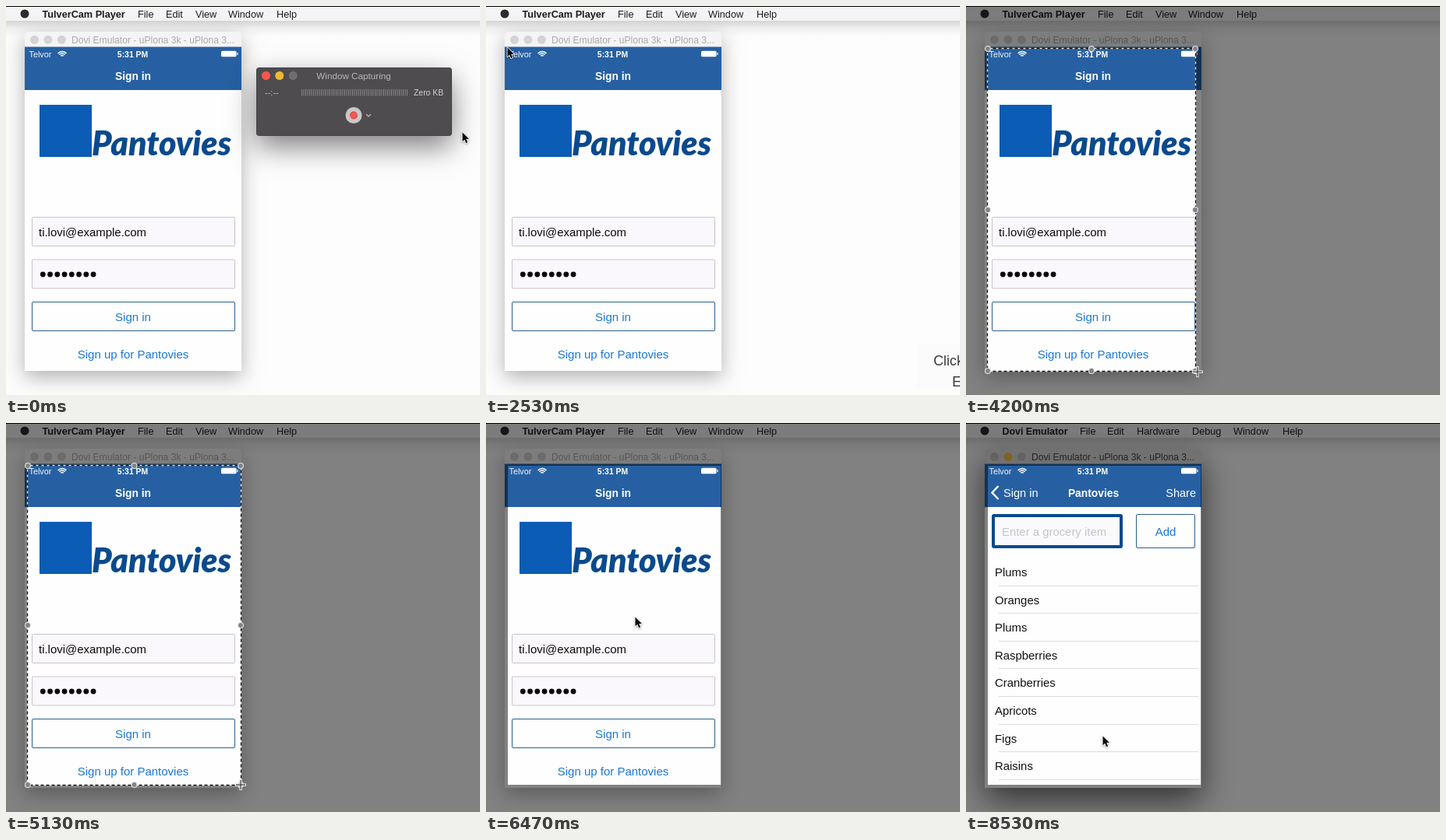
Animation of 608x500 px, one loop 8790 ms. Source, as an HTML page with a canvas:

```html
<!DOCTYPE html>
<html lang="en">
<head>
<meta charset="utf-8">
<title>Sign in demo</title>
<style>
  html, body { margin: 0; width: 100%; height: 100%; overflow: hidden; background: #fefdfe; }
  canvas { display: block; }
</style>
</head>
<body>
<canvas id="stage" width="608" height="500"></canvas>
<script>
const ctx = document.getElementById('stage').getContext('2d');
const W = 608, H = 500, LOOP = 8790, STEP = 200 / 3;
const SANS = '"Liberation Sans", Arial, sans-serif';
const BLUE = '#2660a2', NAVY = '#0a4a8d', LINK = '#1878d8', EDGE = '#2c5f8d';
const APP = 'Pantovies', DEVICE = 'Dovi Emulator';
const ITEMS = ['Plums', 'Oranges', 'Plums', 'Raspberries', 'Cranberries', 'Apricots', 'Figs', 'Raisins'];

// Moments of the story, in ms
const T = { panelOff: 900, hintOn: 990, drag: 2860, release: 5250, record: 6250,
            activate: 7520, push: 7790, pushEnd: 8270, listOn: 8320, listEnd: 8520 };

// Pointer path: time, x, y
const PATH = [
  [0, 585, 161], [140, 570, 158], [400, 480, 146], [600, 449, 139], [930, 445, 138],
  [1030, 420, 138], [1267, 259, 138], [1500, 150, 112], [1870, 60, 72], [2200, 33, 56],
  [2533, 27, 52], [2800, 28, 55], [2867, 28, 56], [3070, 52, 96], [3267, 125, 238],
  [3400, 185, 336], [3467, 195, 362], [3730, 250, 432], [4000, 288, 468], [4270, 300, 471],
  [4600, 301, 465], [5250, 301, 465], [5400, 282, 430], [5670, 215, 305], [5930, 172, 258],
  [6270, 172, 256], [6467, 191, 248], [6600, 192, 262], [6870, 184, 350], [7070, 177, 394],
  [7200, 175, 401], [8790, 175, 401]
];

const clamp = v => Math.max(0, Math.min(1, v));
const span = (t, a, b) => clamp((t - a) / (b - a));
const easeOut = p => 1 - (1 - p) ** 3;

function pointer(t) {
  const i = Math.max(1, PATH.findIndex(k => k[0] > t));
  const [t0, x0, y0] = PATH[i - 1], [t1, x1, y1] = PATH[i];
  const p = span(t, t0, t1);
  return { x: x0 + (x1 - x0) * p, y: y0 + (y1 - y0) * p };
}

function text(str, x, y, size, color, { align = 'left', weight = 'normal', family = SANS } = {}) {
  ctx.font = `${weight} ${size}px ${family}`;
  ctx.textAlign = align;
  ctx.fillStyle = color;
  ctx.fillText(str, x, y);
}

function rect(x, y, w, h, color) {
  ctx.fillStyle = color;
  ctx.fillRect(x, y, w, h);
}

function dot(x, y, r, color) {
  ctx.beginPath();
  ctx.arc(x, y, r, 0, 7);
  ctx.fillStyle = color;
  ctx.fill();
}

function box(x, y, w, h, r, fill, stroke, line = 1) {
  ctx.beginPath();
  ctx.roundRect(x, y, w, h, r);
  if (fill) { ctx.fillStyle = fill; ctx.fill(); }
  if (stroke) { ctx.strokeStyle = stroke; ctx.lineWidth = line; ctx.stroke(); }
}

function poly(points, color, line) {
  ctx.beginPath();
  points.forEach(([x, y]) => ctx.lineTo(x, y));
  ctx.strokeStyle = color;
  ctx.lineWidth = line;
  ctx.stroke();
}

function shadowed(blur, dy, alpha, draw) {
  ctx.save();
  ctx.shadowColor = `rgba(0,0,0,${alpha})`;
  ctx.shadowBlur = blur;
  ctx.shadowOffsetY = dy;
  draw();
  ctx.restore();
}

function faded(alpha, draw) {
  if (alpha <= 0) return;
  ctx.save();
  ctx.globalAlpha *= alpha;
  draw();
  ctx.restore();
}

function shifted(dx, draw) {
  ctx.save();
  ctx.translate(dx, 0);
  draw();
  ctx.restore();
}

function menuBar(active) {
  const shade = ctx.createLinearGradient(0, 19, 0, 40);
  shade.addColorStop(0, 'rgba(0,0,0,.16)');
  shade.addColorStop(.45, 'rgba(0,0,0,.05)');
  shade.addColorStop(1, 'rgba(0,0,0,0)');
  rect(0, 19, W, 21, shade);
  rect(0, 0, W, 19, '#f4f3f5');
  rect(0, 0, W, 1, '#000');
  dot(24, 10, 5.5, '#2b2b2b');
  const menus = active
    ? [['File', 146], ['Edit', 181], ['Hardware', 219], ['Debug', 290], ['Window', 343], ['Help', 406]]
    : [['File', 169], ['Edit', 205], ['View', 243], ['Window', 285], ['Help', 347]];
  text(active ? DEVICE : 'TulverCam Player', 46.5, 14.5, active ? 12.4 : 12.7, '#1c1c1c', { weight: 'bold' });
  menus.forEach(([name, x]) => text(name, x, 14.5, 12.7, '#1c1c1c'));
}

function panel() {
  shadowed(36, 14, .5, () => box(321, 79, 251, 88, 4, '#4e4c4e'));
  box(321.5, 79.5, 250, 87, 4, null, '#454345');
  dot(333.5, 89.5, 5.5, '#f9584f');
  dot(350.8, 89.5, 5.5, '#efb92f');
  dot(368.2, 89.5, 5.5, '#706e70');
  text('Window Capturing', 446, 93.5, 11.7, '#b9b8b9', { align: 'center' });
  text('--:--', 332, 115, 11, '#c4c3c4');
  for (let x = 379; x < 515; x += 2.5) rect(x, 107, 1, 8.5, '#858385');
  text('Zero KB', 523, 115, 10.4, '#d4d3d4');
  dot(446, 140.5, 10.5, '#c9c7c8');
  dot(446, 140.5, 5, '#e5443f');
  for (let i = -3; i <= 3; i += 2) poly([[444 + i, 144], [448 + i, 137]], 'rgba(255,190,185,.6)', .7);
  poly([[462, 139], [465, 142], [468, 139]], '#b5b3b5', 1.3);
}

function hint() {
  rect(553, 435, 55, 56, '#fcfbfc');
  text('Click', 574, 462, 17.8, '#3a3a3a');
  text('End', 598, 489, 17.8, '#3a3a3a');
}

function signInPage() {
  rect(24, 108, 278, 361, '#fefefe');
  rect(43, 127, 67, 67, '#0a5cb4');
  text(APP, 110, 192, 42.8, NAVY, { weight: 'italic 900', family: 'Lato, sans-serif' });
  box(33.5, 271.5, 260, 37, 1, '#faf8fc', '#c6c5ca');
  text('ti.lovi@example.com', 42, 295.5, 14.95, '#0a0a0a');
  box(33.5, 326, 260, 37, 1, '#faf8fc', '#c6c5ca');
  for (let i = 0; i < 8; i++) dot(47.3 + i * 9.25, 345, 3.4, '#0a0a0a');
  box(33.5, 380.5, 260, 37, 1.5, '#fefefe', EDGE);
  text('Sign in', 163, 405, 15, LINK, { align: 'center' });
  text('Sign up for ' + APP, 163, 453, 15, LINK, { align: 'center' });
}

function listPage(rows) {
  rect(24, 108, 278, 361, '#fefefe');
  box(35, 119, 164, 40, 1, '#faf9fc', NAVY, 4);
  text('Enter a grocery item', 46, 144.5, 14.9, '#c5c4ca');
  box(218.5, 117.5, 75, 43, 1.5, '#fefefe', EDGE);
  text('Add', 256, 144.5, 15, LINK, { align: 'center' });
  faded(rows, () => ITEMS.forEach((name, i) => {
    const y = 197 + i * 35.6;
    text(name, 37, y, 14.9, '#111');
    rect(42, Math.round(y + 11.5), 256, 1, '#dddce1');
  }));
}

function navBar(p) {
  rect(24, 52.5, 278, 55.5, BLUE);
  const bold = { align: 'center', weight: 'bold' };
  faded(1 - p * 2, () => text('Sign in', 163 - 90 * p, 95, 13.8, '#fff', bold));
  faded(p, () => {
    poly([[41.5, 81], [33.5, 89.5], [41.5, 98]], '#fff', 2.4);
    text('Sign in', 48 + 90 * (1 - p), 95, 14.6, '#fff');
    text(APP, 163.5 + 110 * (1 - p), 95, 13.8, '#fff', bold);
    text('Share', 295, 95, 14.5, '#fff', { align: 'right' });
  });
}

function statusBar() {
  text('Telvor', 29.5, 65.5, 10.8, '#f4f7fb');
  [2.5, 5, 7.4].forEach(r => {
    ctx.beginPath();
    ctx.arc(72, 66, r, -Math.PI * .76, -Math.PI * .24);
    ctx.strokeStyle = '#fff';
    ctx.lineWidth = 1.5;
    ctx.stroke();
  });
  text('5:31 PM', 162.5, 65.5, 10.4, '#fff', { align: 'center', weight: 'bold' });
  box(276, 57.7, 19.5, 7.6, 1.5, '#fff');
  rect(296.3, 60, 1.2, 3, '#fff');
}

function phone(t) {
  const active = t >= T.activate;
  const frame = () => box(24, 33, 278, 436, [5, 5, 0, 0], '#f6f5f6');
  shadowed(active ? 40 : 26, active ? 16 : 8, active ? .6 : .3, frame);
  box(24, 33, 278, 19.5, [5, 5, 0, 0], active ? '#dedddf' : '#f5f4f5');
  const gray = active ? '#c3c2c4' : '#d3d2d4';
  [gray, active ? '#f3bf45' : gray, gray].forEach((c, i) => dot(36.5 + i * 17.4, 43.3, 5.5, c));
  text(DEVICE + ' - uPlona 3k - uPlona 3...', 84, 47.5, 12.1, active ? '#454446' : '#aaa9ab');

  const p = easeOut(span(t, T.push, T.pushEnd));
  ctx.save();
  ctx.beginPath();
  ctx.rect(24, 52, 278, 417);
  ctx.clip();
  if (p < 1) shifted(-84 * p, signInPage);
  if (p > 0) shifted(278 * (1 - p), () => listPage(span(t, T.listOn, T.listEnd)));
  navBar(p);
  statusBar();
  ctx.restore();
}

function selection(t) {
  const end = t < T.release ? pointer(Math.max(T.drag + 7, t - STEP)) : { x: 301, y: 465 };
  const x = 28, y = t < 4000 ? 56 : 55;
  const w = Math.max(1, Math.round(end.x) - x), h = Math.max(1, Math.round(end.y) - y);
  ctx.beginPath();
  ctx.rect(0, 0, W, H);
  ctx.rect(x, y, w, h);
  ctx.fillStyle = 'rgba(0,0,0,.49)';
  ctx.fill('evenodd');
  if (t >= T.record) return;

  ctx.strokeStyle = '#f2f2f2';
  ctx.lineWidth = 1.3;
  ctx.strokeRect(x - .5, y - .5, w + 1, h + 1);
  ctx.setLineDash([4, 3]);
  ctx.lineDashOffset = -Math.round(t / STEP) % 7;
  ctx.strokeStyle = '#111';
  ctx.strokeRect(x - .5, y - .5, w + 1, h + 1);
  ctx.setLineDash([]);
  if (w < 12) return;
  for (const i of [0, .5, 1]) for (const j of [0, .5, 1]) {
    if (i === .5 && j === .5) continue;
    dot(x + w * i, y + h * j, 4, '#e4e3e4');
    dot(x + w * i, y + h * j, 2.9, '#838284');
  }
}

function cross(x, y) {
  for (const [color, line, r] of [['#ececec', 3.4, 7], ['#3c3c3c', 1.2, 6]]) {
    poly([[x - r, y], [x + r, y]], color, line);
    poly([[x, y - r], [x, y + r]], color, line);
  }
}

function arrow(x, y) {
  ctx.save();
  ctx.translate(x + .5, y + 1.5);
  ctx.scale(.9, .9);
  ctx.lineJoin = 'round';
  ctx.beginPath();
  [[0, 0], [0, 13], [3, 10.3], [5.1, 15.2], [7.4, 14.2], [5.3, 9.4], [9.3, 9.2]]
    .forEach(([dx, dy]) => ctx.lineTo(dx, dy));
  ctx.closePath();
  ctx.strokeStyle = '#fff';
  ctx.lineWidth = 1.8;
  shadowed(3, 1, .35, () => ctx.stroke());
  ctx.fillStyle = '#0a0a0a';
  ctx.fill();
  ctx.restore();
}

function draw(now) {
  const t = Math.floor((now % LOOP + 5) / STEP) * STEP;
  rect(0, 0, W, H, '#fefdfe');
  menuBar(t >= T.activate);
  phone(t);
  if (t < T.panelOff) panel();
  if (t >= T.hintOn && t < T.drag) hint();
  if (t >= T.drag) selection(t);
  const { x, y } = pointer(t);
  (t >= T.drag && t < T.release ? cross : arrow)(x, y);
}

function tick() {
  draw(performance.now());
  requestAnimationFrame(tick);
}
tick();
</script>
</body>
</html>
```
